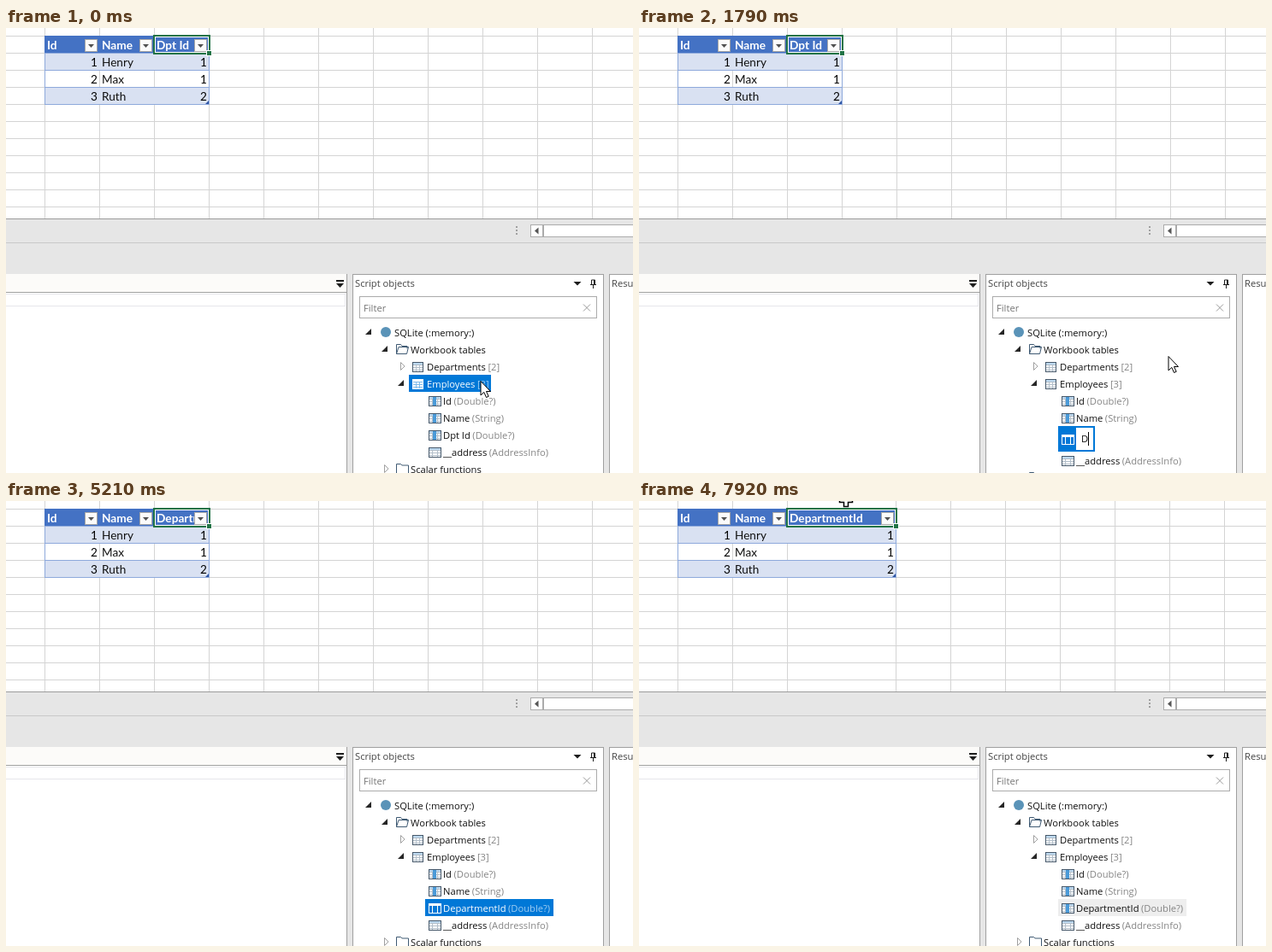
Animation, 733 px wide and 521 px high, one loop 7990 ms. Source, as an HTML page:

```html
<!DOCTYPE html>
<html lang="en">
<head>
<meta charset="utf-8">
<title>Renaming a table column</title>
<style>
  html, body { margin: 0; width: 100%; height: 100%; overflow: hidden; background: #e6e6e6; }
  svg { display: block; width: 733px; height: 521px; }
  text { white-space: pre; }
  .ui { font: 11.2px "Open Sans", "Noto Sans", sans-serif; }
  .cell { font: 13.6px Lato, sans-serif; }
  .head { font: bold 13.7px Lato, sans-serif; fill: #fff; }
</style>
</head>
<body>
<svg id="stage" viewBox="0 0 733 521" xmlns="http://www.w3.org/2000/svg"></svg>
<script>
const LOOP = 7990;
const BLUE = '#0078d7', GREEN = '#217346', BORDER = '#a0a0a0', INK = '#111';
const stage = document.getElementById('stage');

// Each list holds [time, ...values]; a value stays until the next entry.
const pointer = [
  [0, 'arrow', 555, 413], [150, 'arrow', 555, 420], [230, 'arrow', 553, 436],
  [310, 'arrow', 550, 456], [390, 'arrow', 547, 470], [460, 'arrow', 547, 474],
  [860, 'arrow', 580, 428], [930, 'arrow', 618, 385], [1010, 'arrow', 619, 384],
  [4820, 'arrow', 613, 372], [4900, 'arrow', 572, 310], [4980, 'arrow', 470, 226],
  [5050, 'plus', 350, 110], [5130, 'plus', 273, 18], [5210, 'none', 0, 0],
  [6510, 'plus', 209, 12], [6590, 'plus', 209, 20], [6660, 'plus', 208, 14],
  [6740, 'none', 0, 0], [7850, 'plus', 248, 2], [7920, 'plus', 242, -1]
];
const typing = [
  [1240, 'Dpt Id', 558], [1790, 'D', 533], [1940, 'De', 540], [2090, 'Dep', 546],
  [2170, 'Depa', 553], [2340, 'Depar', 557], [2490, 'Depart', 561],
  [3110, 'Departm', 571], [3190, 'Departme', 578], [3270, 'Departmen', 585],
  [3420, 'Department', 589], [3570, 'DepartmentI', 592], [3800, 'DepartmentId', 599],
  [4120, '', 0]
];
const columnEdge = [[0, 237], [6280, 276], [7690, 300]];
const dragEdge = [
  [0, 0], [5820, 237], [6050, 250], [6130, 266], [6200, 276], [6280, 0],
  [7290, 276], [7530, 290], [7610, 300], [7690, 0]
];

const at = (list, t) => list.filter(step => step[0] <= t).pop();
const rect = (x, y, w, h, fill) =>
  `<rect x="${x}" y="${y}" width="${w}" height="${h}" fill="${fill}" shape-rendering="crispEdges"/>`;
const frame = (x, y, w, h, line, fill = '#fff') =>
  rect(x, y, w, h, line) + rect(x + 1, y + 1, w - 2, h - 2, fill);
const outline = (x, y, w, h, line, size = 1) =>
  `<rect x="${x + size / 2}" y="${y + size / 2}" width="${w - size}" height="${h - size}" ` +
  `fill="none" stroke="${line}" stroke-width="${size}" shape-rendering="crispEdges"/>`;
const path = (d, fill, stroke = 'none', width = 1) =>
  `<path d="${d}" fill="${fill}" stroke="${stroke}" stroke-width="${width}"/>`;
const text = (x, y, s, cls = 'ui', extra = `fill="${INK}"`) =>
  `<text x="${x}" y="${y}" class="${cls}" ${extra}>${s}</text>`;
const range = n => [...Array(n).keys()];

function filterButton(right) {
  return frame(right - 17, 13, 15, 15, '#a6a6a6', '#fbfbfb') +
    path(`M${right - 13} 19h7l-3.5 4z`, '#505050');
}

function sheet(t) {
  const edge = at(columnEdge, t)[1], drag = at(dragEdge, t)[1];
  let s = rect(0, 0, 733, 223, '#fff');
  for (const k of range(11)) s += rect(0, 9 + 20 * k, 733, 1, '#d4d4d4');
  for (const x of [45, 109, 173, ...range(8).map(k => edge + 64 * k)])
    s += rect(x, 0, 1, 223, '#d4d4d4');

  s += rect(45, 9, edge - 44, 20, '#4472c4');
  for (const y of [30, 70]) s += rect(45, y, edge - 44, 19, '#d9e1f2');
  for (const y of [29, 49, 69, 89]) s += rect(45, y, edge - 44, 1, '#8ea9db');
  for (const x of [45, edge]) s += rect(x, 29, 1, 61, '#8ea9db');

  const title = t < 4210 ? 'Dpt Id' : 'DepartmentId';
  s += text(48, 25, 'Id', 'head') + text(112, 25, 'Name', 'head');
  s += `<clipPath id="title"><rect x="173" y="9" width="${edge - 190}" height="20"/></clipPath>`;
  s += text(176, 25, title, 'head', 'clip-path="url(#title)"');

  [['Henry', 1], ['Max', 1], ['Ruth', 2]].forEach(([name, dept], i) => {
    const y = 45 + 20 * i;
    s += text(107, y, i + 1, 'cell', 'text-anchor="end"') + text(112, y, name, 'cell') +
      text(edge - 2, y, dept, 'cell', 'text-anchor="end"');
  });
  s += path(`M${edge} 85v4h-4z`, '#2f56a5');

  // selected cell
  s += outline(172, 8, edge - 170, 23, GREEN, 2) + outline(174, 10, edge - 174, 19, '#fff');
  s += [109, 173, edge].map(filterButton).join('');
  s += rect(edge - 3, 26, 7, 7, '#fff') + rect(edge - 2, 27, 5, 5, GREEN);

  if (drag) s += rect(173, 0, 1, 223, '#7f7f7f') + rect(drag, 0, 1, 223, '#7f7f7f');
  return s;
}

function chrome() {
  let s = rect(0, 223, 733, 298, '#e6e6e6') + rect(0, 223, 733, 1, '#9b9b9b') +
    rect(0, 251, 733, 1, '#c8c8c8');
  for (const y of [232, 236, 240]) s += rect(596, y, 2, 2, '#a0a0a0');
  s += frame(613, 230, 15, 15, '#ababab') + frame(628, 230, 120, 15, '#ababab');
  s += path('M622.5 233.5v8l-4.5-4z', '#555');

  // left editor pane
  s += rect(0, 288, 398, 21, '#fcfbf9') + rect(0, 309, 398, 212, '#fff') +
    rect(398, 288, 1, 233, BORDER) + rect(0, 309, 399, 1, BORDER);
  s += frame(-2, 311, 399, 15, '#e6e6ea');
  s += rect(386, 295, 9, 1.5, '#1e1e1e') + path('M386 299h9l-4.5 5z', '#1e1e1e');

  // object and result panes
  s += frame(405, 288, 294, 240, BORDER) + frame(705, 288, 60, 240, BORDER);
  s += text(408, 303, 'Script objects', 'ui', 'fill="#444"') +
    text(708, 303, 'Results', 'ui', 'fill="#444"');
  s += path('M663.5 297h9l-4.5 4.5z', '#1e1e1e');
  s += path('M684.5 300v-5h4v5M683 300.5h7M686.5 301v4', 'none', '#1e1e1e') +
    rect(687, 295, 2, 5, '#1e1e1e');
  s += frame(413, 314, 278, 26, '#ababab');
  s += text(418, 332, 'Filter', 'ui', 'fill="#767676"');
  s += path('M675 323.5l8 8m0-8l-8 8', 'none', '#999');
  return s;
}

function tableIcon(x, y, kind, active) {
  const table = kind === 'table', w = table ? 13 : 15;
  const line = active ? '#fff' : '#46586a';
  const thin = active ? (table ? '#7fbbea' : '#fff') : '#b3bfca';
  let s = frame(x, y - 5, w, 12, line, active && !table ? BLUE : '#fff');
  s += rect(x + 1, y - 4, w - 2, 2, active ? '#fff' : '#bcd8ef');
  for (const dy of [-2, 1, 4]) s += rect(x + 1, y + dy, w - 2, 1, active && !table ? BLUE : thin);
  for (const dx of [4, w - 5]) s += rect(x + dx, y - 2, 1, 8, thin);
  if (kind === 'column' && !active) s += rect(x + 5, y - 4, 4, 10, '#4a9ad8');
  return s;
}

const FOLDER = '#3f5a73';
const openFolder = y =>
  path(`M456.5 ${y + 5.5}v-11h5l1.5 2h6v3M456.5 ${y + 5.5}l2.5-8h11.5l-2 8z`, '#fff', FOLDER);
const shutFolder = y => path(`M456.5 ${y + 5.5}v-11h5l1.5 1.5h7.5v9.5z`, '#fff', FOLDER);
const opened = (x, y) => path(`M${x} ${y - 4}v7h-7z`, '#262626');
const closed = (x, y) => path(`M${x + .5} ${y - 4.5}l4.5 4.5l-4.5 4.5z`, '#fff', '#a0a0a0');

// state: 'on' = focused selection, 'idle' = unfocused selection
function node(x, y, kind, label, note, state, right) {
  const on = state === 'on';
  let s = '';
  if (state) s += rect(x - 21, y - 10, right - x + 21, 20, on ? BLUE : '#eeeeee');
  s += tableIcon(x - 17, y, kind, on);
  return s + text(x, y + 5,
    `${label}<tspan dx="2.5" fill="${on ? '#9fcdf2' : '#858585'}">${note}</tspan>`,
    'ui', `fill="${on ? '#fff' : INK}"`);
}

function editor(value, right, whole) {
  let s = rect(490, 466, right - 490, 30, BLUE) + rect(511, 468, right - 513, 26, '#fff');
  s += tableIcon(494, 481, 'column', true);
  if (whole) s += rect(517, 473, right - 524, 16, '#99c9ef');
  s += text(517, 485, value);
  return s + rect(right - 8, 473, 1, 16, '#000');
}

function tree(t) {
  const [, value, right] = at(typing, t) || [0, '', 0];
  const shift = value ? 10 : 0;
  let s = opened(427, 356) + opened(446, 376) + opened(465, 416) + closed(461, 396) +
    closed(442, 516 + shift);
  s += '<circle cx="444" cy="356" r="6" fill="#5a93b8"/>' + text(454, 361, 'SQLite (:memory:)');
  s += openFolder(376) + text(473, 381, 'Workbook tables');
  s += node(492, 396, 'table', 'Departments', '[2]');
  s += node(492, 416, 'table', 'Employees', '[3]', t < 460 && 'on', 567);
  s += node(511, 436, 'column', 'Id', '(Double?)');
  s += node(511, 456, 'column', 'Name', '(String)');
  if (value) s += editor(value, right, t < 1790);
  else if (t < 1240) s += node(511, 476, 'column', 'Dpt Id', '(Double?)', t >= 460 && 'on', 599);
  else s += node(511, 476, 'column', 'DepartmentId', '(Double?)', t < 5820 ? 'on' : 'idle', 640);
  s += node(511, 496 + shift, 'address', '__address', '(AddressInfo)');
  s += shutFolder(516 + shift) + text(473, 521 + shift, 'Scalar functions');
  if (t >= 780 && t < 860)
    s += `<g opacity=".16">${frame(549, 497, 48, 23, '#777')}${text(556, 512, 'Dpt Id')}</g>`;
  return s;
}

function cursor(t) {
  const [, kind, x, y] = at(pointer, t);
  if (kind === 'arrow')
    return path(`M${x} ${y + .5}v16.5l3.8-3.6 2.7 6.1 2.7-1.2-2.7-5.8h5z`, '#fff', '#000');
  if (kind === 'plus')
    return path(`M${x - 2.5} ${y - 7.5}h5v5h5v5h-5v5h-5v-5h-5v-5h5z`, '#fff', '#000', 1.5);
  return '';
}

let last = '';
function draw(t) {
  const s = sheet(t) + chrome() + tree(t) + cursor(t);
  if (s !== last) stage.innerHTML = last = s;
}

const start = performance.now();
function tick(now) {
  draw(Math.max(0, now - start) % LOOP);
  requestAnimationFrame(tick);
}
draw(0);
requestAnimationFrame(tick);
</script>
</body>
</html>
```
